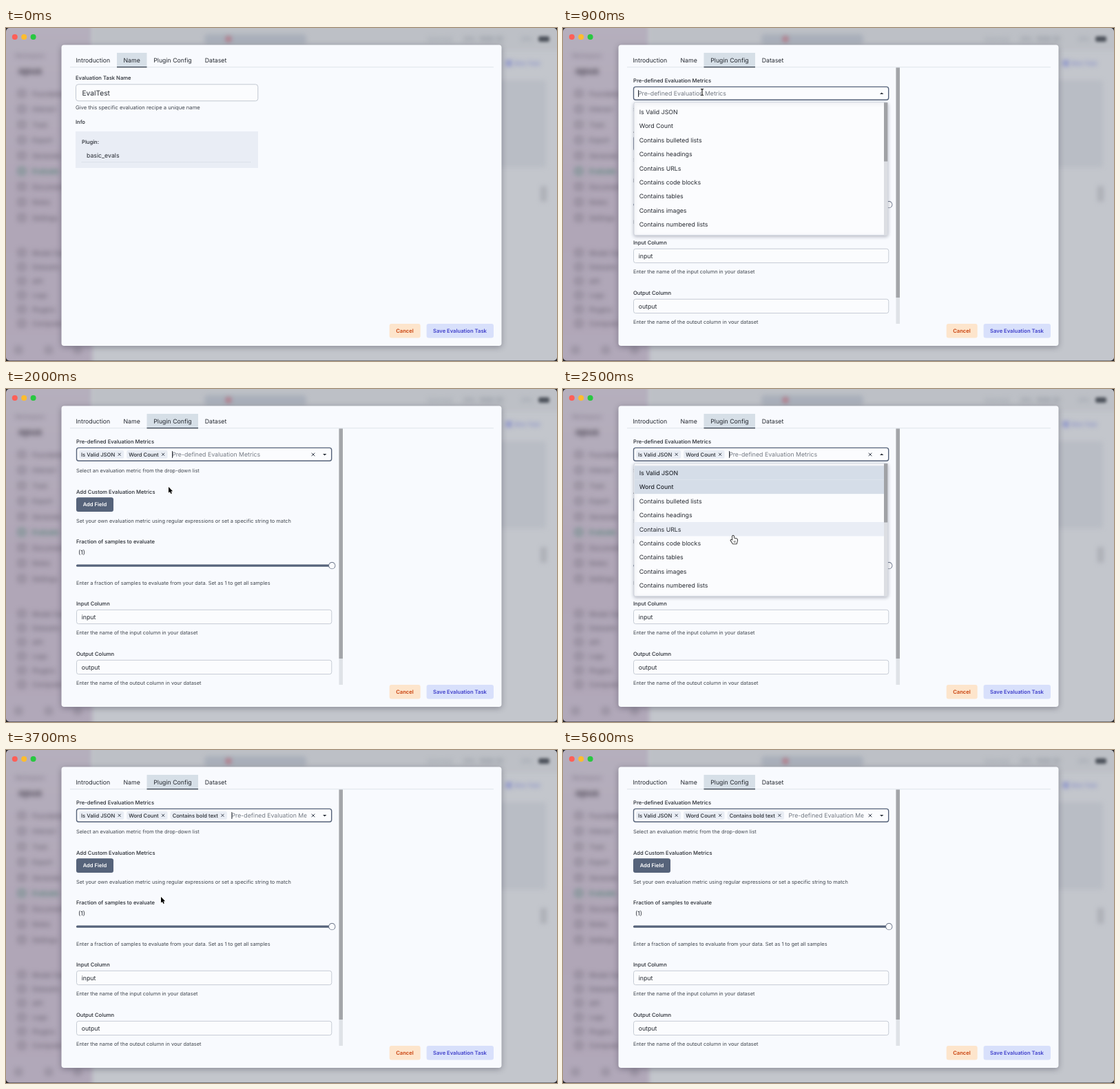
Recreate the animation shown at these times as an HTML page with a canvas. Size 800x483 px, loop 5700 ms.

```html
<!DOCTYPE html>
<html lang="en">
<head>
<meta charset="utf-8">
<title>Evaluation task form</title>
<style>
html, body { margin: 0; width: 100%; height: 100%; overflow: hidden; background: #000; }
canvas { display: block; width: 800px; height: 483px; }
</style>
</head>
<body>
<canvas id="stage" width="800" height="483"></canvas>
<script>
const W = 800, H = 483, LOOP = 5700;
const ctx = document.getElementById('stage').getContext('2d');
const INK = '#262a31', SOFT = '#41474f', SLATE = '#56637a', PAPER = '#f8fafe';
const TINY = 7.4, SMALL = 7.65, BODY = 8.75;
const PLACEHOLDER = 'Pre-defined Evaluation Metrics';
const ITEMS = ['Is Valid JSON', 'Word Count'].concat(
  ['bulleted lists', 'headings', 'URLs', 'code blocks', 'tables', 'images', 'numbered lists', 'bold text',
   'italic text', 'underline text', 'strikethrough text', 'blockquotes'].map(s => 'Contains ' + s));
const ROW = 20.43, LIST_TOP = 111.3;

// ---- drawing helpers ----
function setFont(size, weight, c = ctx) {
  c.textRendering = 'geometricPrecision';
  c.font = `${weight} ${size}px Inter, sans-serif`;
}
function text(s, x, y, { size = BODY, weight = 400, color = INK, align = 'left', c = ctx } = {}) {
  setFont(size, weight, c);
  c.textAlign = align;
  c.fillStyle = color;
  c.fillText(s, x, y + size * 0.37);
}
const label = (s, x, y) => text(s, x, y, { size: SMALL, weight: 500 });
const helper = (s, x, y, size = TINY) => text(s, x, y, { size, color: SOFT });

function box(x, y, w, h, r, fill, stroke, line = 1, c = ctx) {
  c.beginPath();
  c.roundRect(x, y, w, h, r);
  if (fill) { c.fillStyle = fill; c.fill(); }
  if (stroke) { c.strokeStyle = stroke; c.lineWidth = line; c.stroke(); }
}
function dot(x, y, r, fill, c = ctx) {
  c.beginPath();
  c.arc(x, y, r, 0, 7);
  c.fillStyle = fill;
  c.fill();
}
function cross(x, y, r) {
  ctx.beginPath();
  ctx.moveTo(x - r, y - r); ctx.lineTo(x + r, y + r);
  ctx.moveTo(x + r, y - r); ctx.lineTo(x - r, y + r);
  ctx.strokeStyle = '#3a4250';
  ctx.lineWidth = 1;
  ctx.stroke();
}
function clipped(x, y, w, h, draw) {
  ctx.save();
  ctx.beginPath();
  ctx.rect(x, y, w, h);
  ctx.clip();
  draw();
  ctx.restore();
}

// ---- blurred page behind the dialog, painted once ----
function makeBackdrop() {
  const cv = document.createElement('canvas');
  cv.width = W; cv.height = H;
  const c = cv.getContext('2d');
  c.fillStyle = '#c3c6cc';
  c.fillRect(0, 0, W, H);
  c.filter = 'blur(3px)';
  const side = c.createLinearGradient(0, 0, 0, H);
  side.addColorStop(0, '#b5afbd');
  side.addColorStop(0.5, '#b0a6b7');
  side.addColorStop(1, '#b1a8b9');
  c.fillStyle = side;
  c.fillRect(-20, -20, 145, H + 40);
  c.fillStyle = '#bdc0c6';
  c.fillRect(125, -10, 700, 42);
  box(288, 9, 148, 15, 5, '#a9afba', null, 1, c);
  dot(323, 16, 4, '#b5707f', c);
  box(700, 76, 84, 126, 4, '#b9bdc5', null, 1, c);
  box(776, 229, 9, 23, 3, '#adb0b7', null, 1, c);
  c.filter = 'blur(3.5px)';
  text('Workspace', 13, 40, { size: 8, color: '#77707f', c });
  text('opus', 18, 62, { size: 14, weight: 700, color: '#4f4957', c });
  const rows = (names, y, step) => names.forEach((s, i) => {
    const color = s === 'Evaluate' ? '#3d7a66' : '#6b6473';
    box(18.5, y + i * step - 4.5, 9, 9, 2, null, color, 1.6, c);
    text(s, 38, y + i * step, { size: 9.5, weight: 500, color, c });
  });
  rows(['Foundation', 'Interact', 'Train', 'Export', 'Generate', 'Evaluate', 'Documents', 'Notes', 'Settings'], 95, 22.5);
  rows(['Model Zoo', 'Datasets', 'API', 'Logs', 'Plugins', 'Computer'], 326, 20.5);
  [18, 62, 104].forEach(x => box(x - 4, 463, 8, 8, 2, null, '#75707d', 1.6, c));
  text('local host', 612, 16, { size: 8, color: '#8f96a2', c });
  text('CPU', 664, 16, { size: 8, color: '#777e8a', c });
  text('RAM 30', 688, 16, { size: 9, color: '#777e8a', c });
  text('GPU', 748, 16, { size: 8, color: '#8f96a2', c });
  dot(730, 51, 4.5, '#858dca', c);
  text('New Task', 738, 51, { size: 8, weight: 600, color: '#7f87c8', c });
  c.filter = 'blur(2px)';
  box(773, 12, 16, 8, 3, '#4e535c', null, 1, c);
  c.filter = 'none';
  return cv;
}
const backdrop = makeBackdrop();

function drawWindow() {
  ctx.fillStyle = '#26262a';
  ctx.fillRect(0, 0, W, H);
  ctx.save();
  ctx.beginPath();
  ctx.roundRect(0, 0, W, H - 0.5, 5);
  ctx.clip();
  ctx.drawImage(backdrop, 0, 0);
  ctx.restore();
  ['#ff5f57', '#febc2e', '#28c840'].forEach((col, i) => dot(12.8 + i * 13.4, 13, 4, col));
  ctx.save();
  ctx.shadowColor = 'rgba(30,30,45,.35)';
  ctx.shadowBlur = 9;
  ctx.shadowOffsetY = 2;
  box(80.5, 24.5, 639, 436.5, 4, PAPER);
  ctx.restore();
}

function drawTabs(active) {
  const tabs = [['Introduction', 101.5, 92, 69], ['Name', 170.5, 161, 43.5],
                ['Plugin Config', 214.2, 204.5, 74.5], ['Dataset', 288.7, 279, 51]];
  ctx.fillStyle = '#dfe4ea';
  ctx.fillRect(93, 56.3, 615, 1);
  tabs.forEach(([s, x, left, w], i) => {
    if (i === active) {
      ctx.fillStyle = '#d6dfe7';
      ctx.fillRect(left, 36, w, 21);
      ctx.fillStyle = '#39424f';
      ctx.fillRect(left, 56, w, 1.3);
    }
    text(s, x, 46.4);
  });
}

function drawButtons() {
  box(556.7, 429, 45, 20.6, 3, '#fde5cc');
  text('Cancel', 579, 439, { size: SMALL, weight: 600, color: '#c9410c', align: 'center' });
  box(610.6, 429, 97.4, 20.6, 3, '#d8e0fb');
  text('Save Evaluation Task', 659, 439, { size: SMALL, weight: 600, color: '#3f3fca', align: 'center' });
}

function drawNamePage() {
  label('Evaluation Task Name', 101, 72);
  box(101.5, 81.8, 264.3, 24, 3.5, '#fbfcfe', '#c2c8d1');
  text('EvalTest', 110.5, 94, { size: 10.2 });
  helper('Give this specific evaluation recipe a unique name', 101, 115.3, SMALL);
  label('Info', 101, 136.2);
  ctx.fillStyle = '#e9edf5';
  ctx.fillRect(101, 150, 265, 53);
  label('Plugin:', 110, 165.5);
  text('basic_evals', 117, 184.3);
  ctx.setLineDash([1, 1]);
  ctx.beginPath();
  ctx.moveTo(110, 194.5); ctx.lineTo(356, 194.5);
  ctx.strokeStyle = '#cfd6e0';
  ctx.lineWidth = 1;
  ctx.stroke();
  ctx.setLineDash([]);
}

function drawSelect(chips, open, caret) {
  box(102.5, 85.4, 370.2, 18.8, 3, '#fbfcfe', SLATE, 1.4);
  let x = 106;
  for (const s of chips) {
    setFont(SMALL, 500);
    const w = ctx.measureText(s).width;
    box(x, 89, w + 16, 11.7, 2.5, '#e9edf4');
    text(s, x + 3, 95, { size: SMALL, weight: 500 });
    cross(x + w + 9.5, 94.8, 2);
    x += w + 20;
  }
  x += chips.length ? 2.5 : 3;
  clipped(100, 86, 336.5, 18, () => text(PLACEHOLDER, x, 95.2, { color: '#737982' }));
  if (caret) {
    ctx.fillStyle = '#20242b';
    ctx.fillRect(x, 90, 0.9, 10);
  }
  if (chips.length) cross(446, 95, 2.3);
  const d = open ? -1 : 1;
  ctx.beginPath();
  ctx.moveTo(460, 95 - d * 1.1); ctx.lineTo(465.4, 95 - d * 1.1); ctx.lineTo(462.7, 95 + d * 1.6);
  ctx.fillStyle = '#2b313b';
  ctx.fill();
}

function drawConfigPage(s) {
  const field = (name, value, hint, y) => {
    label(name, 102, y);
    box(102.5, y + 9, 370.3, 20.3, 3, '#fbfcfe', '#c6ccd5');
    text(value, 109.7, y + 19.2);
    helper(hint, 102, y + 42.2);
  };
  clipped(81, 57.5, 638, 371.5, () => {
    label(PLACEHOLDER, 102, 76);
    helper('Select an evaluation metric from the drop-down list', 102, 118);
    label('Add Custom Evaluation Metrics', 102, 148.8);
    box(102, 157.3, 54, 20.6, 3, SLATE);
    text('Add Field', 129, 167.5, { size: SMALL, weight: 600, color: '#fff', align: 'center' });
    helper('Set your own evaluation metric using regular expressions or set a specific string to match', 102, 191);
    label('Fraction of samples to evaluate', 102, 221.5);
    text('(1)', 105, 237.2);
    box(102, 254.6, 371, 3.1, 1.5, SLATE);
    dot(473.3, 256.2, 5.1, '#6a7488');
    dot(473.3, 256.2, 4.2, '#fbfcfe');
    helper('Enter a fraction of samples to evaluate from your data. Set as 1 to get all samples', 102, 281);
    field('Input Column', 'input', 'Enter the name of the input column in your dataset', 311.3);
    field('Output Column', 'output', 'Enter the name of the output column in your dataset', 384.3);
    ctx.fillStyle = '#dfe2e7';
    ctx.fillRect(483.5, 57, 5.5, 372);
    ctx.fillStyle = '#a3a5a9';
    ctx.fillRect(483.5, 57, 5.5, 334);
    drawSelect(s.chips, s.open, s.caret);
    if (s.open) drawMenu(s);
  });
}

function drawMenu({ chips, hover, scroll }) {
  ctx.save();
  ctx.shadowColor = 'rgba(40,50,70,.3)';
  ctx.shadowBlur = 5;
  ctx.shadowOffsetY = 1.5;
  box(103, 107.7, 368.5, 193, 2.5, '#fbfcfe', '#ccd2db', 0.8);
  ctx.restore();
  clipped(103.5, 108.2, 367.8, 192.2, () => {
    ITEMS.forEach((s, i) => {
      const y = LIST_TOP + i * ROW - scroll;
      const on = chips.includes(s);
      if (on || i === hover) {
        ctx.fillStyle = on ? '#d5dde8' : '#e9edf5';
        ctx.fillRect(103.5, y, 362.5, ROW);
      }
      text(s, 110.7, y + 10.3, { weight: on ? 500 : 400 });
    });
    ctx.fillStyle = '#dcdee3';
    ctx.fillRect(466, 108, 6, 193);
    ctx.fillStyle = '#a0a2a6';
    ctx.fillRect(466, 108 + scroll * 0.44, 6, 85.5);
  });
}

// ---- pointer ----
function shape(points, fill, stroke, line) {
  ctx.beginPath();
  points.forEach(([x, y]) => ctx.lineTo(x, y));
  ctx.closePath();
  ctx.lineJoin = 'round';
  ctx.strokeStyle = stroke;
  ctx.lineWidth = line;
  ctx.stroke();
  ctx.fillStyle = fill;
  ctx.fill();
}
const pointers = {
  arrow: () => shape([[0, 0], [0, 8.6], [2, 6.9], [3.4, 10], [4.9, 9.3], [3.5, 6.4], [6.1, 6.2]], '#000', '#fff', 1.4),
  beam() {
    for (const [col, w] of [['#fff', 2.4], ['#111', 1.1]]) {
      ctx.beginPath();
      ctx.moveTo(-2, -4.6); ctx.quadraticCurveTo(0, -4.6, 0, -3.4);
      ctx.lineTo(0, 3.4); ctx.quadraticCurveTo(0, 4.6, -2, 4.6);
      ctx.moveTo(2, -4.6); ctx.quadraticCurveTo(0, -4.6, 0, -3.4);
      ctx.moveTo(0, 3.4); ctx.quadraticCurveTo(0, 4.6, 2, 4.6);
      ctx.strokeStyle = col;
      ctx.lineWidth = w;
      ctx.stroke();
    }
  },
  hand() {
    shape([[-1, 0.4], [0, -0.4], [1, 0.4], [1.3, 3.6], [3.2, 3.8], [5.6, 4.6], [6.2, 6], [5.6, 9.2], [4.8, 11.4],
           [-0.4, 11.4], [-1.8, 9], [-3.6, 6.6], [-2.6, 5.6], [-0.8, 6.8]], '#fff', '#111', 1.6);
    ctx.fillStyle = '#111';
    [1.2, 2.8].forEach(x => ctx.fillRect(x, 7.2, 0.6, 2.6));
  }
};
// time, x, y
const PATH = [[300, 242, 47], [700, 202, 93], [950, 202, 93], [1150, 196, 122], [1300, 196, 122], [1500, 241, 93],
  [1700, 241, 93], [1900, 236, 142], [2000, 236, 142], [2200, 246, 95], [2300, 246, 95], [2500, 247, 213],
  [2600, 244, 237], [2950, 244, 237], [3200, 225, 213]];
const ease = k => k * k * (3 - 2 * k);
function pointerAt(t) {
  const i = PATH.findIndex(p => p[0] > t);
  if (i < 0) return PATH[PATH.length - 1].slice(1);
  if (i === 0) return PATH[0].slice(1);
  const [a, x0, y0] = PATH[i - 1], [b, x1, y1] = PATH[i];
  const e = ease((t - a) / (b - a));
  return [x0 + (x1 - x0) * e, y0 + (y1 - y0) * e];
}

// ---- timeline ----
const CLICKS = [800, 1300, 1700, 2000, 2300, 3500];
const PICKS = [[1300, 0], [2000, 1], [3500, 9]];
function stateAt(t) {
  const done = CLICKS.filter(c => c <= t);
  const open = done.length % 2 === 1;
  const chips = PICKS.filter(p => p[0] <= t).map(p => ITEMS[p[1]]);
  const caret = done.length > 0 && (t - done[done.length - 1]) % 600 < 300;
  const scroll = 94.3 * ease(Math.min(1, Math.max(0, (t - 2620) / 260)));
  const [x, y] = pointerAt(t);
  // the highlighted row stays put while the list scrolls
  let hover = y > LIST_TOP ? Math.floor((y - LIST_TOP + scroll) / ROW) : -1;
  if (t >= 2600 && t < 3000) hover = 6;
  if (t >= 2480 && t < 2560) hover = 4;
  return { open, chips, caret, scroll, hover, x, y };
}

function draw(t) {
  const s = stateAt(t), config = t >= 200;
  drawWindow();
  drawTabs(config ? 2 : 1);
  if (config) drawConfigPage(s); else drawNamePage();
  drawButtons();
  if (t >= 300 && t < 4900) {
    const kind = s.y > 84 && s.y < 105 ? 'beam' : s.open || s.y < 58 ? 'hand' : 'arrow';
    ctx.save();
    ctx.translate(s.x, s.y);
    pointers[kind]();
    ctx.restore();
  }
}

const start = performance.now();
function tick() {
  draw((performance.now() - start) % LOOP);
  requestAnimationFrame(tick);
}
tick();
</script>
</body>
</html>
```
